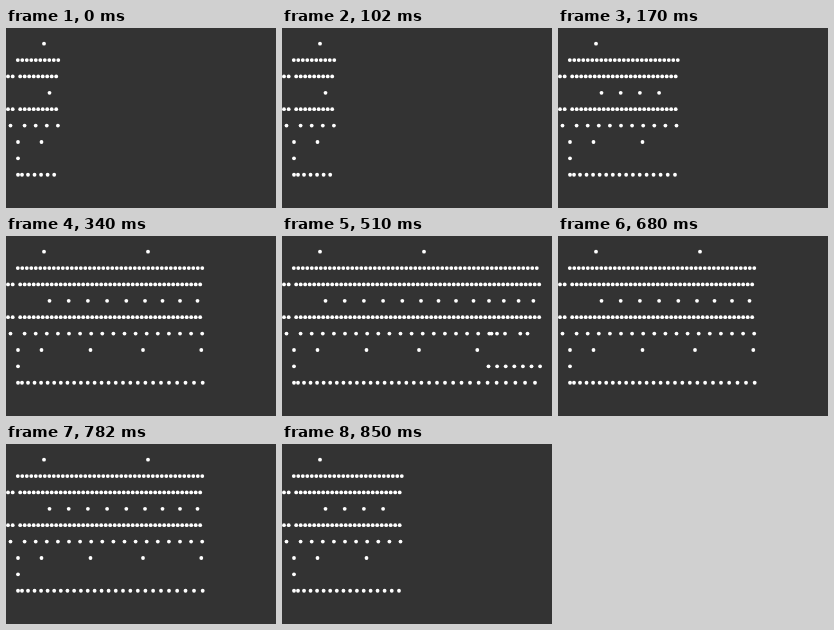
Animation of 270x180 px, one loop 1020 ms. Source, as an HTML page with a canvas:

```html
<!DOCTYPE html>
<html>
<head>
<meta charset="utf-8">
<style>
html, body { margin: 0; width: 100%; height: 100%; overflow: hidden; background: #333; }
canvas { display: block; }
</style>
</head>
<body>
<canvas id="stage" width="270" height="180"></canvas>
<script>
const ctx = document.getElementById('stage').getContext('2d');
const STEP_MS = 170, RADIUS = 1.9, TOP = 15.7, ROW_GAP = 16.38;
const REVEAL = [53, 120, 198, 270, 198, 120];

// Dots at even spacing; a nonzero stretch widens the gaps along the row.
const run = (start, gap, count, stretch = 0) =>
  Array.from({ length: count }, (_, i) => start + gap * i + stretch * i ** 3);

const dense = [2, 6.7, ...run(14.2, 4.5, 55)];
const rows = [
  [38, 142],
  run(11.8, 4.5, 55),
  dense,
  [...run(43.5, 19.2, 5), ...run(139, 17.5, 4), ...run(207, 14.8, 4)],
  dense,
  [4.5, ...run(18.6, 11.1, 18), 209.5, 215, 223, 238.3, 245.5],
  [12, 35.5, 84.5, 137, 195.3],
  [12, ...run(206.5, 8.6, 7)],
  [12, 16, ...run(22, 6.53, 31, 0.0013)]
];

function draw(time) {
  const limit = REVEAL[Math.floor(time / STEP_MS) % REVEAL.length];
  ctx.fillStyle = '#333';
  ctx.fillRect(0, 0, 270, 180);
  ctx.fillStyle = '#fff';
  rows.forEach((row, i) => {
    for (const x of row.filter(x => x < limit)) {
      ctx.beginPath();
      ctx.arc(x, TOP + ROW_GAP * i, RADIUS, 0, Math.PI * 2);
      ctx.fill();
    }
  });
}

const start = performance.now();
function tick() {
  draw(performance.now() - start);
  requestAnimationFrame(tick);
}
tick();
</script>
</body>
</html>
```
